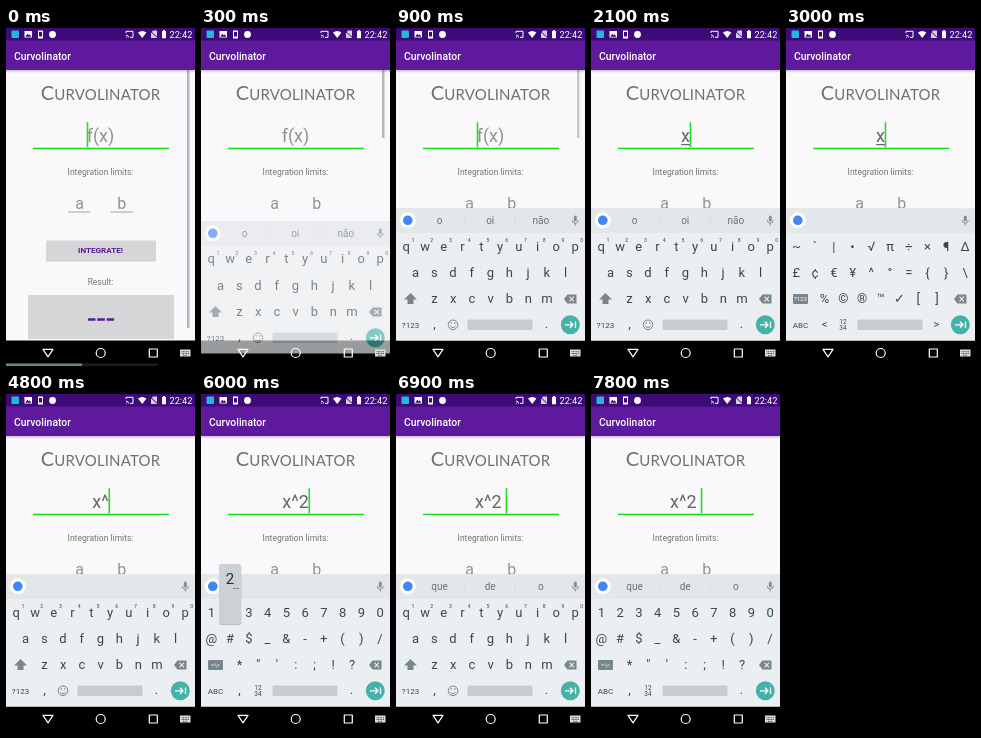
An HTML page that plays this animation: 189 px wide and 338 px high, repeating every 8000 ms.

```html
<!DOCTYPE html>
<html lang="en">
<head>
<meta charset="utf-8">
<title>Integral calculator demo</title>
<style>
html, body { margin: 0; width: 100%; height: 100%; overflow: hidden; background: #000; }
svg { display: block; width: 100vw; height: 100vh; font-family: Roboto, sans-serif; }
.mid { text-anchor: middle; }
.key { text-anchor: middle; fill: #37474f; font-size: 13px; }
.line { fill: none; stroke-linejoin: round; }
</style>
</head>
<body>
<svg viewBox="0 0 189 338">
  <defs>
    <clipPath id="appClip"><rect id="viewport" y="42" width="189" height="270"/></clipPath>
    <linearGradient id="shade" x2="0" y2="1">
      <stop stop-color="#000" stop-opacity=".22"/><stop offset="1" stop-color="#000" stop-opacity="0"/>
    </linearGradient>
  </defs>
  <rect width="189" height="338" fill="#fbf8fc"/>

  <g clip-path="url(#appClip)">
    <text x="94.5" y="72.3" class="mid" font-size="20" letter-spacing=".15" fill="#707070"
      font-family="Lato, sans-serif">C<tspan font-size="15">URVOLINATOR</tspan></text>
    <text id="hint" x="94.5" y="113.9" class="mid" font-size="18" fill="#929292">f(x)</text>
    <text id="entry" y="113.9" font-size="18" fill="#666"></text>
    <rect id="composing" x="90.2" y="116" width="8.8" height="1.2" fill="#666"/>
    <rect x="27" y="119.7" width="136" height="1.5" fill="#18df18"/>
    <rect id="caret" y="94.2" width="1.6" height="25" fill="#25dc25"/>
    <text x="94.5" y="147.3" class="mid" font-size="8.5" fill="#757575">Integration limits:</text>
    <g class="mid" font-size="16" fill="#929292">
      <text x="73.5" y="181.3">a</text><text x="115.7" y="181.3">b</text>
    </g>
    <path d="M62 184H84.5M104.5 184H127" stroke="#8c8c8c" stroke-width=".8"/>
    <rect x="40" y="213.5" width="110" height="20" rx="1" fill="#000" opacity=".16"/>
    <rect x="40" y="212.5" width="110" height="19.5" rx="1" fill="#d6d5d7"/>
    <text x="94.5" y="225.2" class="mid" font-size="8.1" font-weight="700" fill="#5b1a9d">INTEGRATE!</text>
    <text x="94.5" y="257" class="mid" font-size="8.5" fill="#757575">Result:</text>
    <rect x="22" y="267" width="146" height="44" fill="#d6d5d7"/>
    <path d="M82 291.5h7.5m1.800 0h7.5m1.800 0h7.5" stroke="#5b1a9d" stroke-width="2.3"/>
    <rect id="scrollbar" x="181" y="42" width="2.5" fill="#b9b6bb"/>
  </g>

  <rect y="12" width="189" height="30" fill="#5e199d"/>
  <rect y="42" width="189" height="3" fill="url(#shade)"/>
  <text x="8" y="31.5" font-size="10.4" font-weight="500" fill="#fff">Curvolinator</text>

  <rect width="189" height="12.5" fill="#3d0b77"/>
  <g id="status" fill="#fff">
    <rect x="5.5" y="2.5" width="7.5" height="7.5" rx="1" fill="#22b8dc"/>
    <path d="M18.500 3h7.500v6.500h-7.500z"/>
    <path d="M19.300 8.700l2-3 1.500 1.500 1-1 1.500 2.500z" fill="#3d0b77"/>
    <path d="M32 2.500h5v8h-5zM33 4v4.500h3V4z" fill-rule="evenodd"/>
    <circle cx="46.5" cy="6.5" r="3.4"/>
    <path class="line" d="M120 5V3.300h7v6h-3M120 7q2.500 0 2.500 2.500M120 9.300h.8" stroke="#fff"/>
    <path d="M132 4.500q4.200-3 8.400 0L136.200 10z"/>
    <path d="M145 5l2-2.500h4v7.500h-6z" opacity=".8"/>
    <path d="M144 3l8 7" stroke="#3d0b77"/>
    <path d="M156 3h1.100V2h1.800v1h1.100v7.300h-4z"/>
    <text x="175" y="9.8" class="mid" font-size="9.2">22:42</text>
  </g>

  <rect y="312.5" width="189" height="26"/>

  <g id="keyboard">
    <rect y="180" width="189" height="132.5" fill="#eceff1"/>
    <rect y="180" width="189" height="25" fill="#e3e7e9"/>
    <g id="words" class="mid" font-size="10" fill="#65727a"></g>
    <path id="dividers" d="M69 187v10M119 187v10" stroke="#d3d8da" stroke-width=".7"/>
    <circle cx="11.8" cy="192.3" r="8" fill="#fff"/>
    <circle cx="11.8" cy="192.3" r="4.8" fill="#4285f4"/>
    <g stroke="#849097" class="line">
      <path d="M179.300 189v3" stroke-width="3" stroke-linecap="round"/>
      <path d="M176.300 192q0 3.200 3 3.200t3-3.200M179.300 195v2.500" stroke-width="1"/>
    </g>
    <g id="pages"></g>
    <rect x="71.5" y="291.5" width="65" height="10.5" rx="1" fill="#c6cdd1"/>
    <path d="M168 271l3.500-4.500h9v9h-9z" fill="#78868e"/>
    <path d="M173.500 268.700l4.500 4.600m0-4.600l-4.500 4.600" stroke="#eceff1" stroke-width="1.1"/>
    <circle cx="174.3" cy="296.8" r="9.5" fill="#45b2aa"/>
    <path d="M169 296.800h8m-3-3l3 3-3 3M179.500 293.500v6.600" class="line" stroke="#fff" stroke-width="1.3"/>
    <g id="popup">
      <rect x="-10.7" y="-47" width="22" height="60" rx="2.5" fill="#000" opacity=".2"/>
      <rect x="-11" y="-48" width="22" height="60" rx="2.5" fill="#cbd1d4"/>
      <text id="popupKey" class="mid" y="-28" font-size="15" fill="#263238"></text>
      <path d="M3 -23.500h1.200m1 0h1.200m1 0h1.200" stroke="#455a64"/>
    </g>
  </g>

  <g class="line" stroke="#fff" stroke-width="1.2">
    <path d="M37 321.300h10l-5 7.500z"/>
    <circle cx="94.7" cy="325" r="4.5"/>
    <rect x="143.3" y="321" width="8" height="8"/>
  </g>
  <path d="M174 321.500h10.500v7H174z" fill="#ddd"/>
  <path d="M175.500 323.700h7.500M175.500 325.500h7.500M177 327.300h4.500" stroke="#222" stroke-width=".8" stroke-dasharray="1 .6"/>
  <g id="bottomStrip">
    <rect y="335.5" width="152" height="2.5" fill="#1c1f1f"/>
    <rect y="335.5" width="76" height="2.5" fill="#5f8a86"/>
  </g>
</svg>

<script>
const LOOP = 8000, STEP = 100, CENTER = 94.5, PITCH = 18.75;
const byId = id => document.getElementById(id);
const show = (id, on) => byId(id).setAttribute('display', on ? 'inline' : 'none');
const set = (id, attrs) => {
  for (const name in attrs) byId(id).setAttribute(name, attrs[name]);
};
const clamp = v => Math.max(0, Math.min(1, v));
const label = (text, x, y, size = 13) => {
  const safe = text.replace(/&/g, '&amp;').replace(/</g, '&lt;');
  return `<text class="key" x="${x}" y="${y}" style="font-size:${size}px">${safe}</text>`;
};
const row = (chars, x, y, size) =>
  [...chars].map((c, i) => label(c, x + i * PITCH, y, size)).join('');

const digitPad = label('12', 57, 295.5, 6.5) + label('34', 57, 302, 6.5);
const modeKey = text =>
  `<rect x="7" y="266" width="15" height="10" rx="1" fill="#78868e"/>
   <text class="mid" x="14.5" y="273.3" font-size="6" fill="#fff">${text}</text>`;
const smiley =
  `<g class="line" stroke="#78868e"><circle cx="57" cy="296.8" r="4.8"/>
   <path d="M54.300 298q2.700 3.500 5.400 0M55.200 294v1.800M58.800 294v1.800"/></g>`;

const pages = {
  letters: row('qwertyuiop', 10.3, 222.5) + row('1234567890', 17, 214, 5.2) +
    row('asdfghjkl', 19.5, 249) + row('zxcvbnm', 38.5, 275) +
    '<path d="M14.500 265l6.500 6.500h-3.500v4.500h-6v-4.500H8z" fill="#78868e"/>' +
    label('?123', 14.5, 299.7, 8) + label(',', 38.5, 299.5) + smiley + label('.', 150.5, 299.5),
  numbers: row('1234567890', 10.3, 223) + row('@#$_&-+()/', 10.3, 249) +
    row('*"\':;!?', 38.5, 275) + modeKey('=\\&lt;') +
    label('ABC', 14.5, 299.7, 8) + label(',', 38.5, 299.5) + digitPad + label('.', 150.5, 299.5),
  symbols: row('~`|•√π÷×¶Δ', 10.3, 223) + row('£¢€¥^°={}\\', 10.3, 249) +
    row('%©®™✓[]', 38.5, 275) + modeKey('?123') +
    label('ABC', 14.5, 299.7, 8) + label('<', 38.5, 300, 11) + digitPad + label('>', 150.5, 300, 11)
};
byId('pages').innerHTML = Object.entries(pages)
  .map(([name, keys]) => `<g id="${name}">${keys}</g>`).join('');

// Each timeline lists [start, value]; the latest started value applies.
const pageTimes = [[0, 'letters'], [2500, 'numbers'], [3000, 'symbols'], [4000, 'letters'],
  [5300, 'numbers'], [6800, 'letters'], [7600, 'numbers']];
const entryTimes = [[0, ''], [2000, 'x'], [3800, 'x^'], [6000, 'x^2'], [6800, 'x^2 ']];
const wordTimes = [[0, 'o oi não'], [2300, ''], [6900, 'que de o']];
const caretStarts = [[0, -400], [2000, 2000], [3800, 3800], [5800, 5800], [6000, 6000], [6800, 6800]];
const taps = [
  { key: 'x', from: 1900, to: 2100, x: 57.2, y: 270 },
  { key: '^', from: 3800, to: 3900, x: 85.3, y: 244.5 },
  { key: '2', from: 5900, to: 6100, x: 29, y: 218 }
];
const at = (times, t) => times.filter(([start]) => start <= t).pop()[1];

const pen = document.createElement('canvas').getContext('2d');
const widthOf = text => {
  pen.font = '18px Roboto, sans-serif';
  return pen.measureText(text).width;
};

function drawField(t) {
  const text = at(entryTimes, t);
  const width = widthOf(text || 'f(x)');
  const left = CENTER - width / 2;
  show('hint', !text);
  byId('entry').textContent = text;
  set('entry', { x: left });
  show('composing', text === 'x');
  set('caret', { x: text ? left + width - 0.3 : left });
  show('caret', Math.floor((t - at(caretStarts, t)) / 500) % 2 === 0);
}

function drawKeyboard(t) {
  const drop = t < 600 ? 155 * Math.exp(-t / 121) : 0;
  set('keyboard', { transform: `translate(0 ${drop})`, opacity: clamp(t / 460) });

  const page = at(pageTimes, t);
  for (const name in pages) show(name, name === page);

  const words = at(wordTimes, t);
  byId('words').innerHTML = words && words.split(' ')
    .map((word, i) => `<text x="${43.5 + i * 50.7}" y="196">${word}</text>`).join('');
  show('dividers', words);

  const tap = taps.find(({ from, to }) => t >= from && t < to);
  show('popup', tap);
  if (tap) {
    set('popup', { transform: `translate(${tap.x} ${tap.y})` });
    byId('popupKey').textContent = tap.key;
  }
}

function drawScroll(t) {
  const resized = t >= 200;
  set('viewport', { height: resized ? 140 : 270 });
  set('scrollbar', { height: resized ? 68 : 258, opacity: clamp((1200 - t) / 400) });
  show('bottomStrip', t < 100);
}

function render(time) {
  const t = Math.floor(time % LOOP / STEP) * STEP;
  drawField(t);
  drawKeyboard(t);
  drawScroll(t);
}

const began = performance.now();
function tick() {
  render(performance.now() - began);
  requestAnimationFrame(tick);
}
tick();
</script>
</body>
</html>
```
